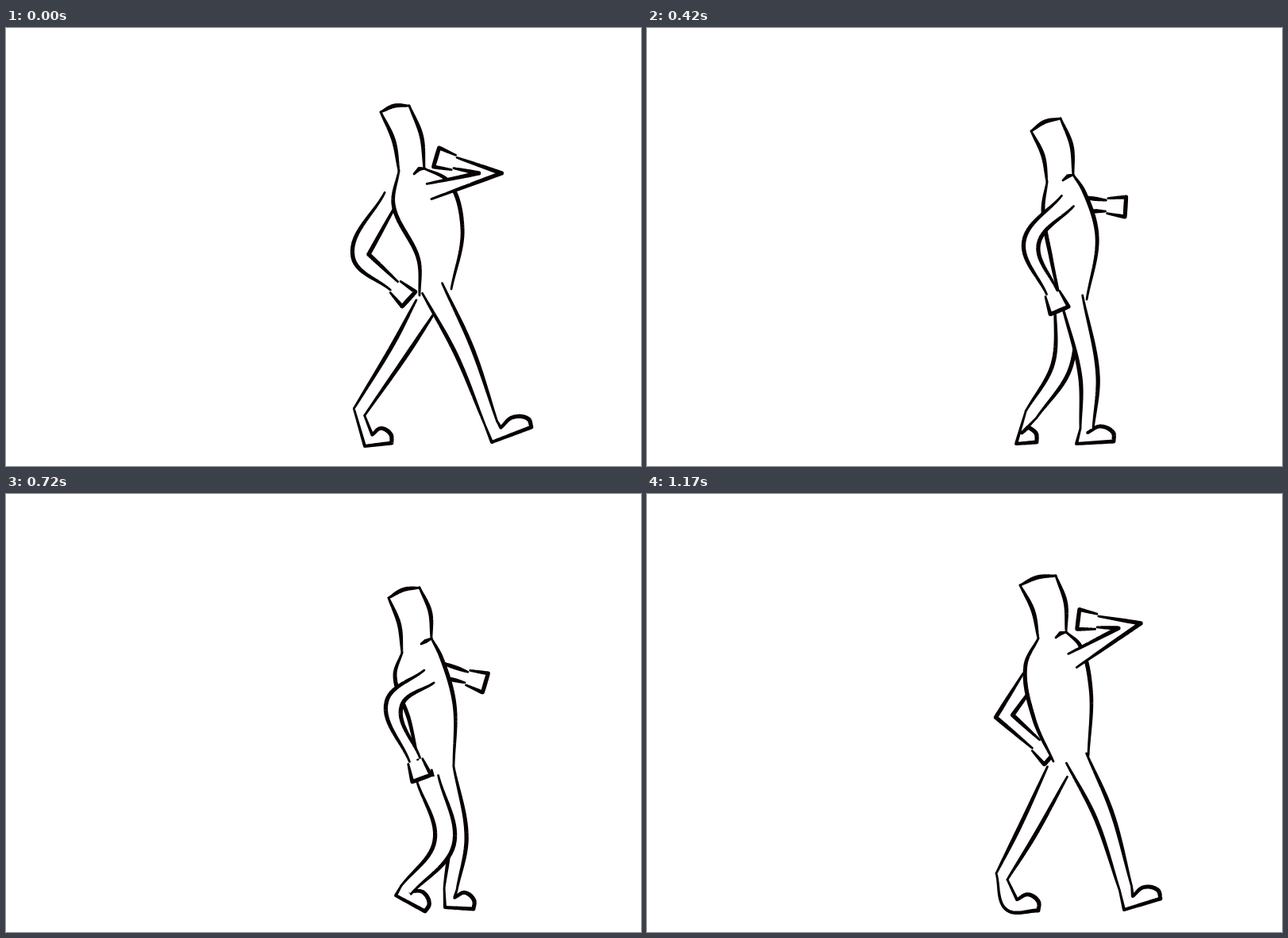
Recreate the animation shown at these times as an HTML page with a canvas. Size 800 px wide and 552 px high, loop 1.2 s.

```html
<!DOCTYPE html>
<html lang="en">
<head>
<meta charset="utf-8">
<title>Walk cycle</title>
<style>
html, body { margin: 0; width: 100%; height: 100%; overflow: hidden; background: #fff; }
canvas { display: block; width: 100vw; height: 100vh; }
</style>
</head>
<body>
<canvas id="stage" width="800" height="552"></canvas>
<script>
const LOOP = 1200, INK = '#080004', PAPER = '#fff';
const ARM = [10, 8, 7], LEG = [14, 11, 8]; // half widths at the joints
const ctx = document.getElementById('stage').getContext('2d');

// Times at which a new drawing appears.
const TICKS = [0, 60, 120, 210, 270, 330, 420, 480, 540, 570,
  600, 660, 720, 780, 840, 900, 990, 1050, 1110, 1170];

// head: back corner, front corner, chin, nape; back and front: down the torso;
// arms: shoulder, elbow, wrist; legs: hip, knee, ankle, heel, toe;
// over: the leg that hides the other one.
const POSES = [
  { t: 0, over: 'legA',
    head: '472,106 508,98 527,177 495,180', back: '488,222 520,293 521,337', front: '557,193 575,252 561,329',
    near: '533,206 610,183 566,170', far: '486,212 447,287 489,325',
    legA: '537,328 577,407 611,498 612,522 662,503', legB: '529,350 497,404 445,484 452,527 486,523' },
  { t: 210, over: 'legA',
    head: '481,130 528,115 538,187 501,198', back: '498,235 518,295 511,337', front: '552,206 561,262 560,335',
    near: '530,217 556,283 583,266', far: '497,232 470,287 511,327',
    legA: '523,337 546,425 516,500 500,514 546,522', legB: '553,345 582,412 551,470 538,490 570,497' },
  { t: 420, over: 'legB',
    head: '484,130 521,114 537,185 504,194', back: '499,228 509,290 521,345', front: '550,205 567,262 554,342',
    near: '530,218 484,271 510,333', far: '545,223 562,223 578,224',
    legA: '528,345 522,427 484,487 465,524 491,522', legB: '535,340 557,440 554,505 541,524 588,521' },
  { t: 540, over: 'legB',
    head: '479,129 510,107 530,174 502,200', back: '495,222 510,285 526,338', front: '552,198 564,260 558,335',
    near: '524,218 474,275 499,322', far: '540,232 566,210 590,187',
    legA: '534,345 507,429 456,481 472,525 495,524', legB: '540,333 584,414 589,500 585,523 631,521' },
  { t: 720, over: 'legA',
    head: '482,131 521,118 536,182 499,200', back: '490,228 508,285 520,340', front: '548,205 565,265 564,342',
    near: '533,230 489,264 515,335', far: '545,222 563,226 580,231',
    legA: '531,358 552,440 504,499 491,506 528,526', legB: '550,345 569,434 560,498 553,521 589,523' },
  { t: 990, over: 'legB',
    head: '479,130 516,114 532,183 499,201', back: '495,240 515,308 523,350', front: '550,205 560,260 564,340',
    near: '533,222 553,268 609,268', far: '492,235 483,272 504,308',
    legA: '552,345 583,415 594,485 587,507 624,494', legB: '533,347 565,419 492,488 486,523 498,524' },
  { t: 1170, over: 'legA',
    head: '470,115 515,103 528,174 493,182', back: '477,215 488,285 512,337', front: '545,190 559,245 556,330',
    near: '536,210 608,166 568,161', far: '482,232 450,280 490,315',
    legA: '541,333 575,404 603,497 601,524 647,510', legB: '517,350 479,425 447,482 453,524 493,525' }
];

const PARTS = ['head', 'back', 'front', 'near', 'far', 'legA', 'legB'];
const mix = (a, b, u) => a + (b - a) * u;
const between = (p, q, u) => [mix(p[0], q[0], u), mix(p[1], q[1], u)];

// Unit vector from p to q, with the distance as third value.
function way(p, q) {
  const x = q[0] - p[0], y = q[1] - p[1], len = Math.hypot(x, y) || 1;
  return [x / len, y / len, len];
}

function blend(a, b, u) {
  const pose = { over: a.over };
  for (const part of PARTS) pose[part] = a[part].map((p, i) => between(p, b[part][i], u));
  return pose;
}

const keys = POSES.map(pose => {
  const key = { ...pose };
  for (const part of PARTS) key[part] = pose[part].split(' ').map(p => p.split(',').map(Number));
  return key;
});
// The widest stride carries on the movement of the two poses before it.
keys.splice(4, 0, { ...blend(keys[2], keys[3], 1.4), t: 600 });
keys.push({ ...keys[0], t: LOOP });

// Smooth curve through the points; tight bends stay sharp.
function curve(pts) {
  const dirs = pts.slice(1).map((p, i) => way(pts[i], p));
  const tangent = (i, own) => {
    const a = dirs[i - 1], b = dirs[i];
    if (!a || !b || a[0] * b[0] + a[1] * b[1] < 0.25) return own;
    return way([0, 0], [a[0] + b[0], a[1] + b[1]]);
  };
  const line = [pts[0]];
  dirs.forEach((own, i) => {
    const p = pts[i], q = pts[i + 1], h = own[2] / 3;
    const a = tangent(i, own), b = tangent(i + 1, own);
    for (let k = 1; k <= 14; k++) {
      const u = k / 14, v = 1 - u;
      line.push([0, 1].map(c => v * v * v * p[c] + 3 * v * v * u * (p[c] + a[c] * h) +
        3 * v * u * u * (q[c] - b[c] * h) + u * u * u * q[c]));
    }
  });
  return line;
}

// Brush line that swells in the middle and thins out at its ends.
function ink(line) {
  const radius = i => 1.4 + 1.25 * Math.sin(Math.PI * i / (line.length - 1));
  ctx.fillStyle = INK;
  ctx.beginPath();
  line.forEach((p, i) => {
    const r = radius(i);
    ctx.moveTo(p[0] + r, p[1]);
    ctx.arc(p[0], p[1], r, 0, Math.PI * 2, true);
    if (!i) return;
    const q = line[i - 1], s = radius(i - 1), [dx, dy] = way(q, p);
    ctx.moveTo(q[0] - dy * s, q[1] + dx * s);
    ctx.lineTo(p[0] - dy * r, p[1] + dx * r);
    ctx.lineTo(p[0] + dy * r, p[1] - dx * r);
    ctx.lineTo(q[0] + dy * s, q[1] - dx * s);
    ctx.closePath();
  });
  ctx.fill();
}

function cover(...lines) {
  ctx.fillStyle = PAPER;
  ctx.beginPath();
  lines.flat().forEach(p => ctx.lineTo(p[0], p[1]));
  ctx.fill();
}

// One side of a limb, with a mitre at the middle joint.
function side(joints, widths, sign) {
  const [a, b] = [way(joints[0], joints[1]), way(joints[1], joints[2])];
  const [mx, my, len] = way([0, 0], [a[0] + b[0], a[1] + b[1]]);
  const mitre = Math.min(2 / len, 1.8);
  return [a, [mx * mitre, my * mitre], b].map(([dx, dy], i) =>
    [joints[i][0] - dy * widths[i] * sign, joints[i][1] + dx * widths[i] * sign]);
}

function limb(joints, widths) {
  const sides = [1, -1].map(sign => curve(side(joints, widths, sign)));
  cover(sides[0], [...sides[1]].reverse());
  sides.forEach(ink);
  return sides.map(s => s[s.length - 1]);
}

function arm(joints) {
  const [, elbow, wrist] = joints, [dx, dy] = way(elbow, wrist);
  const fist = [2.5, 0.9, -0.9, -2.5].map(turn => {
    const x = 15 + 16 * Math.cos(turn), y = 16 * Math.sin(turn);
    return [wrist[0] + dx * x - dy * y, wrist[1] + dy * x + dx * y];
  });
  const outline = curve(fist);
  cover(outline);
  ink(outline);
  limb(joints, ARM);
}

function leg([hip, knee, ankle, heel, toe]) {
  const joints = [hip, knee, ankle], [dx, dy] = way(heel, toe);
  const above = (u, h) => {
    const [x, y] = between(heel, toe, u);
    return [x + dy * h, y - dx * h];
  };
  const rear = side(joints, LEG, 1)[2], front = side(joints, LEG, -1)[2];
  const foot = curve([rear, heel, toe, above(1, 11), above(0.66, 20), above(0.32, 13), front]);
  cover(foot);
  ink(foot);
  limb(joints, LEG);
}

// Line from a to b, arched by k to its left.
function bow(a, b, k) {
  const [dx, dy] = way(a, b), [x, y] = between(a, b, 0.5);
  return curve([a, [x + dy * k, y - dx * k], b]);
}

function torso({ head: [rear, brow, chin, nape], back, front }) {
  const spine = curve([nape, ...back]), belly = curve([chin, ...front]);
  cover(spine, [...belly].reverse());
  [spine, belly, bow(rear, nape, 5), bow(rear, brow, 4), bow(brow, chin, 6),
    [chin, between(chin, nape, 0.2), [chin[0] - 13, chin[1] + 7]]].forEach(ink);
}

function draw(time) {
  const tick = TICKS.filter(t => t <= time).pop();
  const i = keys.findIndex(k => k.t > tick) - 1;
  const a = keys[i], b = keys[i + 1];
  const pose = blend(a, b, (tick - a.t) / (b.t - a.t));

  ctx.fillStyle = PAPER;
  ctx.fillRect(0, 0, 800, 552);
  arm(pose.far);
  leg(pose.over === 'legA' ? pose.legB : pose.legA);
  torso(pose);
  leg(pose[pose.over]);
  arm(pose.near);
}

const start = performance.now();
function loop() {
  draw((performance.now() - start) % LOOP);
  requestAnimationFrame(loop);
}
loop();
</script>
</body>
</html>
```
